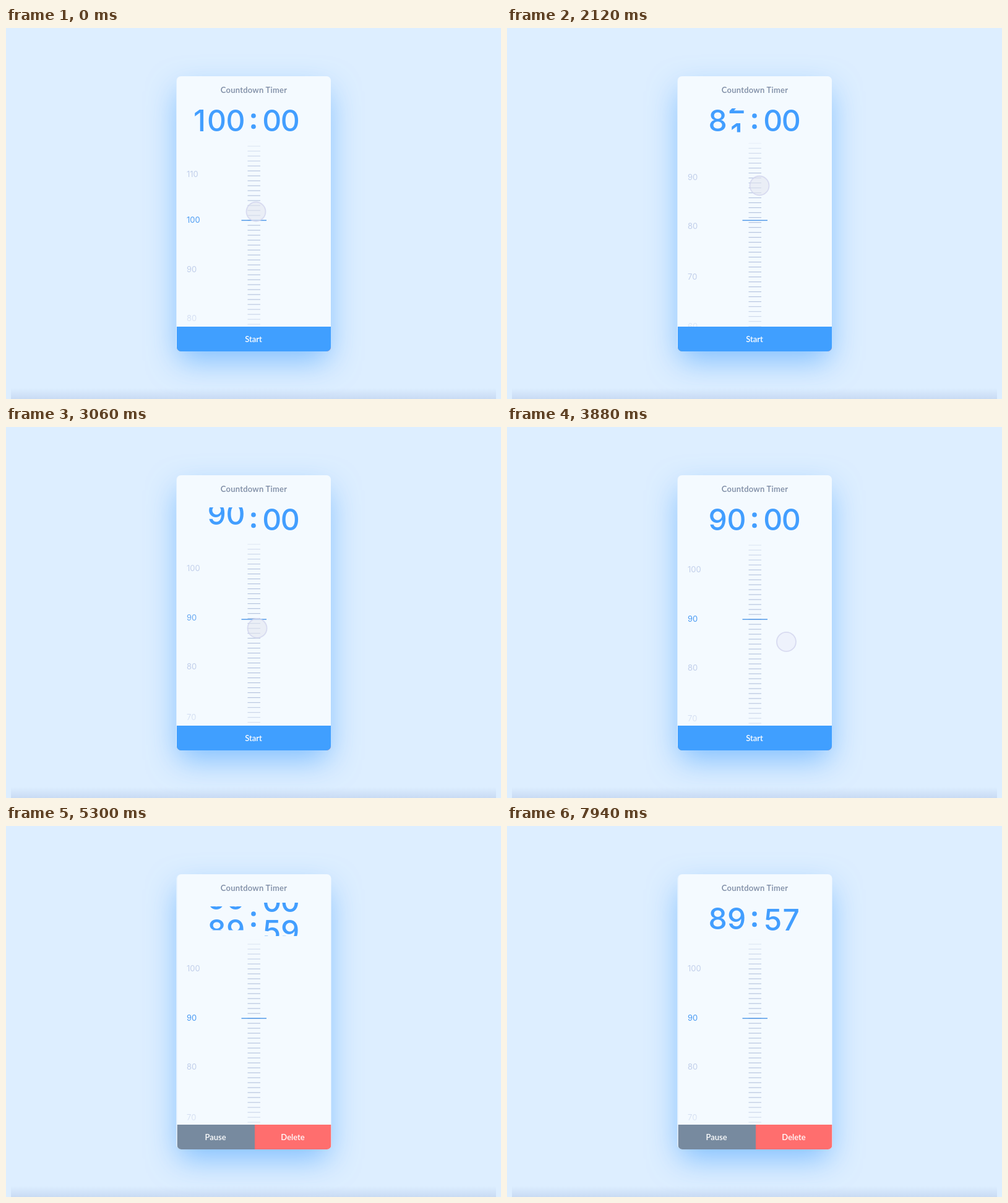
Animation, 800 px wide and 600 px high, one loop 8 s. Source, as an HTML page:

```html
<!DOCTYPE html>
<html lang="en">
<head>
<meta charset="utf-8">
<title>Countdown Timer</title>
<style>
  html, body { margin: 0; width: 100%; height: 100%; overflow: hidden; background: #ddeeff; }
  #stage { position: relative; width: 800px; height: 600px; overflow: hidden; background: #ddeeff; }
  #floor { position: absolute; left: 8px; right: 8px; bottom: 0; height: 18px;
    background: linear-gradient(transparent, rgba(176, 196, 230, .45)); }
  #card { position: absolute; left: 275.5px; top: 78px; width: 249.5px; height: 444.5px;
    border-radius: 7px; overflow: hidden; background: #f4faff; }
  #glow { position: absolute; left: 275px; top: 78px; width: 250px; height: 444px; border-radius: 7px;
    box-shadow: 0 20px 50px -4px rgba(64, 159, 255, .6); }
  .bar { position: absolute; left: 0; bottom: 0; width: 100%; height: 39.5px; }
  #start { background: #409fff; }
  #pair { background: linear-gradient(90deg, #778a9f 50.3%, #ff6e6e 50.3%); }
  svg { position: absolute; left: 0; top: 0; }
  .ui { font: 600 13px Lato, sans-serif; text-anchor: middle; fill: #fff; }
  .digit { font: 500 48px Inter, sans-serif; text-anchor: middle; fill: #429eff; }
  .label { font: 400 13px Inter, sans-serif; }
</style>
</head>
<body>
<div id="stage">
  <div id="floor"></div>
  <div id="glow"></div>
  <div id="card">
    <div id="pair" class="bar"></div>
    <div id="start" class="bar"></div>
  </div>
  <svg id="art" width="800" height="600" viewBox="0 0 800 600">
    <defs>
      <linearGradient id="fade" gradientUnits="userSpaceOnUse" x1="0" y1="183" x2="0" y2="483">
        <stop offset="0" stop-color="#fff" stop-opacity="0"/>
        <stop offset=".03" stop-color="#fff" stop-opacity=".4"/>
        <stop offset=".16" stop-color="#fff"/>
        <stop offset=".86" stop-color="#fff"/>
        <stop offset="1" stop-color="#fff" stop-opacity=".35"/>
      </linearGradient>
      <mask id="edges" maskUnits="userSpaceOnUse" x="275" y="183" width="250" height="300">
        <rect x="275" y="183" width="250" height="300" fill="url(#fade)"/>
      </mask>
      <clipPath id="minuteWindow"><rect x="290" y="130" width="105" height="38.5"/></clipPath>
      <clipPath id="secondWindow"><rect x="405" y="124" width="80" height="54"/></clipPath>
    </defs>
    <text class="ui" x="400.5" y="105" letter-spacing=".25" style="fill:#7b8aa3">Countdown Timer</text>
    <g fill="#429eff"><circle cx="400" cy="142" r="3.8"/><circle cx="400" cy="159.5" r="3.8"/></g>
    <g id="minutes" clip-path="url(#minuteWindow)"></g>
    <g id="seconds" clip-path="url(#secondWindow)"></g>
    <g mask="url(#edges)">
      <g id="ticks" fill="#b7c5df"></g>
      <g id="labels"></g>
    </g>
    <rect x="380.5" y="310.4" width="40.5" height="1.4" fill="#4a95e8"/>
    <text id="startText" class="ui" x="400" y="507.5">Start</text>
    <g id="pairText" class="ui"><text x="338.5" y="508">Pause</text><text x="463.5" y="508">Delete</text></g>
    <circle id="cursor" r="15.5" stroke="#d3d5ee" stroke-opacity=".8" stroke-width="1.8"/>
  </svg>
</div>
<script>
const LOOP = 8000, CENTER = 311, STEP = 8;
const $ = id => document.getElementById(id);

// Rows: time, values..., with an easing strength leading into the row.
const scaleKeys = [
  { t: 60, v: [100] }, { t: 840, v: [87], k: 1.7 }, { t: 1340, v: [87] },
  { t: 2120, v: [81.43], k: 1.2 }, { t: 2200, v: [81], k: 1.3 },
  { t: 2360, v: [81] }, { t: 3160, v: [90], k: 2.3 }
];
const cursorKeys = [
  { t: 60, v: [404, 297] }, { t: 420, v: [434, 230] }, { t: 840, v: [416, 278] },
  { t: 940, v: [416, 278] }, { t: 1180, v: [407, 302] }, { t: 1340, v: [407, 302] },
  { t: 2120, v: [408, 255], k: 1.2 }, { t: 2200, v: [408, 252], k: 1.3 },
  { t: 2360, v: [408, 252] }, { t: 3160, v: [406, 327], k: 2.3 },
  { t: 3700, v: [406, 327] }, { t: 4470, v: [822, 514] }
];
const presses = [[0, 420], [1180, 2220], [2300, 3220]];
const secondStarts = [5180, 6280, 7380], ROLL = 560;

const clamp = p => Math.min(1, Math.max(0, p));
const inOut = (p, k = 2) => p < .5 ? .5 * (2 * p) ** k : 1 - .5 * (2 - 2 * p) ** k;
const outQuart = p => 1 - (1 - p) ** 4;

function sample(keys, t) {
  const i = keys.findIndex(key => key.t > t);
  if (i < 0) return keys[keys.length - 1].v;
  if (i === 0) return keys[0].v;
  const a = keys[i - 1], b = keys[i];
  const p = inOut((t - a.t) / (b.t - a.t), b.k);
  return a.v.map((n, j) => n + (b.v[j] - n) * p);
}

function add(parent, tag, attrs) {
  const node = document.createElementNS('http://www.w3.org/2000/svg', tag);
  for (const name in attrs) node.setAttribute(name, attrs[name]);
  return parent.appendChild(node);
}

// One odometer column: the current digit leaves as the next one arrives.
function column(parent, x, pitch, base = 10, hideZero = false) {
  const cells = [0, 1].map(() => add(parent, 'text', { class: 'digit', x }));
  return (value, baseline) => {
    const low = Math.floor(value);
    cells.forEach((cell, i) => {
      const digit = (low + i) % base;
      cell.textContent = hideZero && !digit ? '' : digit;
      cell.setAttribute('y', baseline + (value - low - i) * pitch);
    });
  };
}

const wheel = (value, unit) => Math.floor(value / unit) + Math.max(0, value % unit - unit + 1);

const minuteColumns = [
  [100, column($('minutes'), 313, 51, 10, true)],
  [10, column($('minutes'), 340.5, 51)],
  [1, column($('minutes'), 371, 51)]
];
const secondColumns = [
  [10, column($('seconds'), 429.8, 48, 6)],
  [1, column($('seconds'), 459.2, 48)]
];

for (let i = -17; i <= 22; i++)
  add($('ticks'), 'rect', { x: 390.5, y: CENTER + i * STEP - .5, width: 20.5, height: 1.2 });

const nudges = { 110: 5, 100: -1.2, 90: -1, 80: -2, 70: 0 };
const labels = [120, 110, 100, 90, 80, 70, 60].map(n => {
  const node = add($('labels'), 'text', { class: 'label', x: 292 });
  node.textContent = n;
  return { n, node };
});

function labelColor(distance) {
  const w = clamp(1 - distance / 6);
  const mix = (a, b) => Math.round(a + (b - a) * w);
  return `rgb(${mix(192, 74)},${mix(206, 155)},${mix(234, 243)})`;
}

function draw(t) {
  const [value] = sample(scaleKeys, t);
  const shown = clamp((t - 5000) / 240);

  const whole = Math.floor(value);
  $('ticks').setAttribute('transform', `translate(0 ${(value - whole) * STEP})`);
  for (const { n, node } of labels) {
    const y = CENTER + (value - n) * STEP + (nudges[n] || 0);
    node.setAttribute('y', y + 4.7);
    node.setAttribute('fill', labelColor(Math.abs(y - 310)));
  }

  const elapsed = secondStarts.reduce((sum, s) => sum + outQuart(clamp((t - s) / ROLL)), 0);
  const total = value * 60 - elapsed;
  const minutes = elapsed ? wheel(total, 60) : value;
  const seconds = elapsed ? total % 60 : 0;
  minuteColumns.forEach(([unit, set]) => set(wheel(minutes, unit), 167));
  secondColumns.forEach(([unit, set]) => set(wheel(seconds, unit), 167 + 1.5 * shown));

  $('start').style.opacity = $('startText').style.opacity = 1 - shown;
  $('pairText').style.opacity = shown;
  $('card').style.transform = `translateX(${.5 * shown}px)`;

  const [x, y] = sample(cursorKeys, t);
  const pressed = presses.some(([from, to]) => t >= from && t < to);
  const cursor = $('cursor');
  cursor.setAttribute('cx', x);
  cursor.setAttribute('cy', y);
  cursor.setAttribute('fill', pressed ? 'rgba(228,230,241,.62)' : 'rgba(234,235,249,.55)');
}

let origin;
function frame(now) {
  origin ??= now;
  draw((now - origin) % LOOP);
  requestAnimationFrame(frame);
}
draw(0);
requestAnimationFrame(frame);
</script>
</body>
</html>
```
